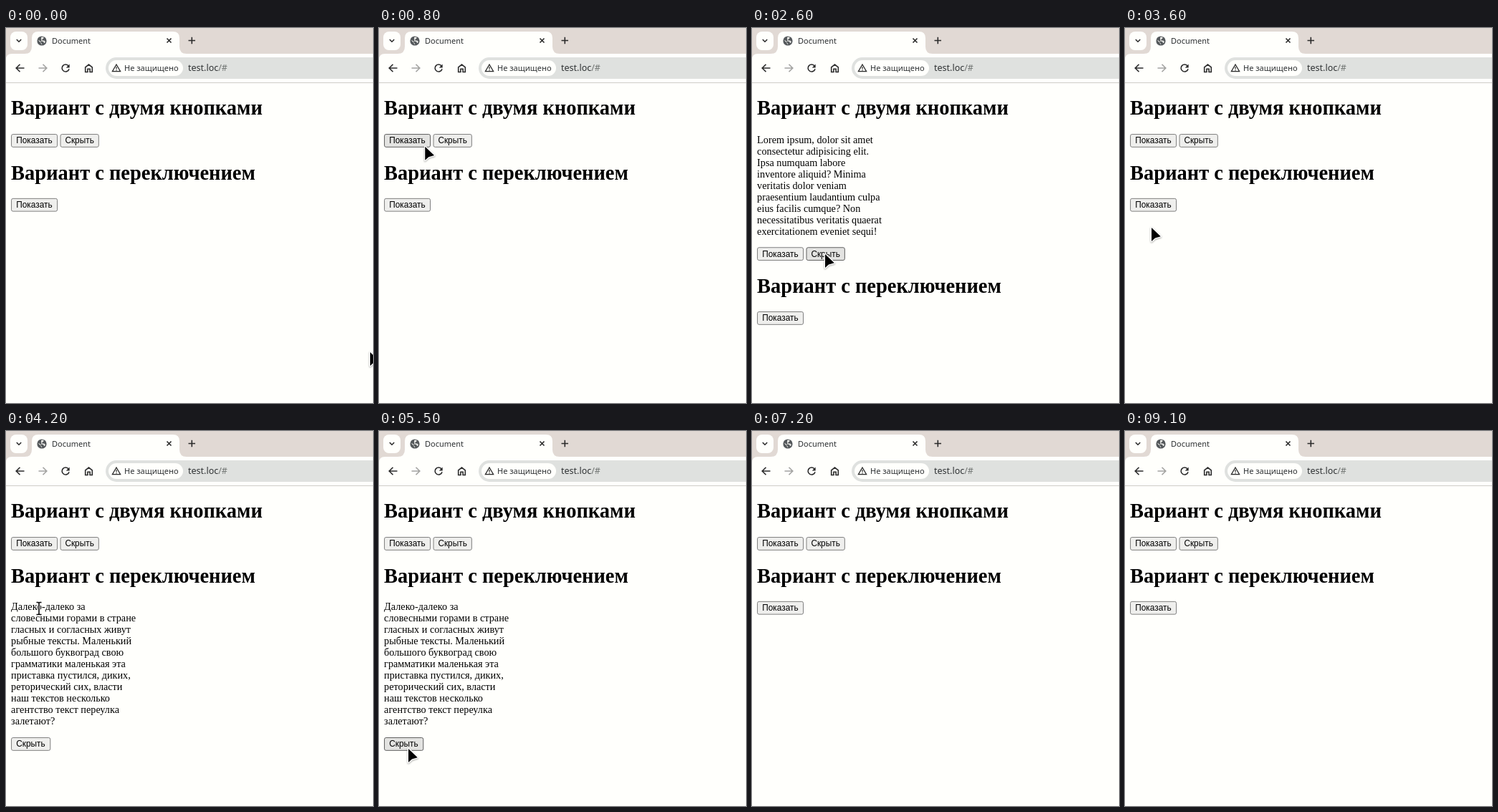
Write an HTML page that moves like this. It is 512x524 px and loops after 9800 ms.

```html
<!DOCTYPE html>
<html lang="ru">
<head>
<meta charset="utf-8">
<title>Document</title>
<style>
  html, body { margin: 0; width: 100%; height: 100%; overflow: hidden; background: #fffffc; }
  svg { position: absolute; left: 0; top: 0; }
  svg text { font-family: "Noto Sans", "Open Sans", sans-serif; fill: #2e3133; }
  .icon { fill: none; stroke: #2b2b2b; stroke-width: 1.6; }
  #page {
    position: absolute; left: 0; top: 77.2px; width: 576px;
    transform: scale(.8889); transform-origin: 0 0;
    font: 16px/18px "Liberation Serif", "Times New Roman", serif; color: #000;
  }
  h1 { margin: 0 8px; padding: 21.44px 0; font-size: 32px; line-height: 37px; white-space: nowrap; }
  p { margin: 0 8px 16px; width: 200px; white-space: pre; }
  .row { margin-left: 8px; height: 21.4px; display: flex; gap: 4px; }
  .btn {
    box-sizing: border-box; height: 21px; padding: 2px 7px;
    border: 1px solid #6f6f6f; border-radius: 3px; background: #efefed;
    font: 13.333px/15px "Liberation Sans", Arial, sans-serif;
  }
  .btn.hover { background: #e3e3e1; border-color: #4c4c4c; }
  #arrow { filter: drop-shadow(0 1px 1px #0005); }
</style>
</head>
<body>
<svg width="512" height="78">
  <rect width="512" height="44" fill="#e1d9d4"/>
  <path d="M0 77V44q0-8 8-8H26q10 0 10-10V14q0-9 9-9H233q9 0 9 9V26q0 10 10 10H512V77z" fill="#fffffc"/>
  <path d="M0 76.5H512" stroke="#cfcdc9"/>
  <rect x="6" y="5" width="24" height="26" rx="8" fill="#fffffc"/>
  <path class="icon" d="M14.8 16l3.2 3.2 3.2-3.2"/>
  <circle cx="50" cy="18" r="6.6" fill="#54585b"/>
  <path d="M45 16.5l3.5 2.6v2.3l1.6 1.8v-1.4l-4-3.4zM49 13l3.4-.6v2.2l-2 1.2v1.6h3l1.6 2.2-1.6 1.6-1.6-2.4h-2.4z" fill="#eeeeeb"/>
  <text x="64" y="22" font-size="11">Document</text>
  <path class="icon" d="M224.5 14.5l6 6m0-6l-6 6M254.5 17.5h9.5M259.3 12.8v9.5"/>
  <path class="icon" d="M25.500 56H14.500M19.500 50.700L14.200 56l5.300 5.300"/>
  <path class="icon" style="stroke:#a3a3a1" d="M45.500 56h11M51.500 50.700l5.300 5.300-5.300 5.300"/>
  <path class="icon" d="M87.300 53.200A5 5 0 1 0 88 57.200"/>
  <path d="M88.700 50.500v5h-5z" fill="#2b2b2b"/>
  <path class="icon" d="M110.700 55v6.500h3.200v-4.200h3.200v4.200h3.200V55l-4.800-3.900z"/>
  <path d="M512 41H154a15 15 0 0 0 0 30H512z" fill="#dfe1df"/>
  <rect x="143" y="45" width="104" height="22" rx="11" fill="#fffffc"/>
  <path class="icon" style="stroke-width:1.3" d="M154 51l5.600 9.700h-11.200zM154 54.300v3M154 58.200v1.300"/>
  <text x="165" y="60" font-size="11" font-weight="500">Не защищено</text>
  <text x="254" y="60" font-size="12.500">test.loc<tspan fill="#707472">/#</tspan></text>
</svg>

<div id="page">
  <h1>Вариант с двумя кнопками</h1>
  <p id="latin">Lorem ipsum, dolor sit amet
consectetur adipisicing elit.
Ipsa numquam labore
inventore aliquid? Minima
veritatis dolor veniam
praesentium laudantium culpa
eius facilis cumque? Non
necessitatibus veritatis quaerat
exercitationem eveniet sequi!</p>
  <div class="row"><div class="btn">Показать</div><div class="btn">Скрыть</div></div>
  <h1>Вариант с переключением</h1>
  <p id="russian">Далеко-далеко за
словесными горами в стране
гласных и согласных живут
рыбные тексты. Маленький
большого буквоград свою
грамматики маленькая эта
приставка пустился, диких,
реторический сих, власти
наш текстов несколько
агентство текст переулка
залетают?</p>
  <div class="row"><div class="btn" id="toggle">Показать</div></div>
</div>

<svg width="512" height="524">
  <g id="cursor">
    <path id="arrow" d="M0 0V19L5 14.600 12.800 12.300z" stroke="#fff" stroke-width="2.600" stroke-linejoin="round" paint-order="stroke"/>
    <g id="beam" fill="none">
      <path d="M-3.500-8.500H-1L0-7.500 1-8.500H3.500M0-7.500V7.500M-3.500 8.500H-1L0 7.500 1 8.500H3.500" stroke="#fff" stroke-width="3.400"/>
      <path d="M-3.500-8.500H-1L0-7.500 1-8.500H3.500M0-7.500V7.500M-3.500 8.500H-1L0 7.500 1 8.500H3.500" stroke="#000" stroke-width="1.500"/>
    </g>
  </g>
</svg>

<script>
const LOOP = 9800, STEP = 100;
const $ = id => document.getElementById(id);
const buttons = [...document.querySelectorAll('.btn')];
const texts = [$('latin'), $('russian')];

// Pointer stops: time in ms, x, y
const stops = [
  [0, 508, 453], [900, 48.500, 155.500], [1900, 48.500, 155.500],
  [2600, 102, 316], [2800, 102, 316], [3600, 37, 279], [3800, 46, 248],
  [4600, 46, 248], [5500, 41, 444], [5600, 41, 443], [5700, 41, 443],
  [5800, 41, 442], [6400, 41, 442], [6800, 168, 486], [7000, 168, 486],
  [7100, 173, 486]
];
const ease = p => p * p * (3 - 2 * p);

function pointerAt(t) {
  const i = stops.findIndex(s => s[0] > t);
  if (i < 0) return stops.at(-1).slice(1);
  const [t0, x0, y0] = stops[i - 1], [t1, x1, y1] = stops[i];
  const p = ease((t - t0) / (t1 - t0));
  return [x0 + (x1 - x0) * p, y0 + (y1 - y0) * p];
}

function over(el, x, y) {
  const r = el.getBoundingClientRect();
  return x >= r.left && x < r.right && y >= r.top && y < r.bottom;
}

const show = (el, on) => { el.style.display = on ? '' : 'none'; };

function draw(now) {
  const t = Math.floor(now % LOOP / STEP) * STEP;
  const [x, y] = pointerAt(t);
  const open = t >= 3900 && t < 6000;
  const visible = t < 7200;

  show(texts[0], t >= 1100 && t < 2900);
  show(texts[1], open);
  $('toggle').textContent = open ? 'Скрыть' : 'Показать';
  for (const b of buttons) b.classList.toggle('hover', visible && over(b, x, y));

  const onText = texts.some(p => over(p, x, y));
  show($('cursor'), visible);
  show($('arrow'), !onText);
  show($('beam'), onText);
  $('cursor').setAttribute('transform', `translate(${x} ${y})`);
}

const start = performance.now();
function tick() {
  draw(performance.now() - start);
  requestAnimationFrame(tick);
}
tick();
</script>
</body>
</html>
```
